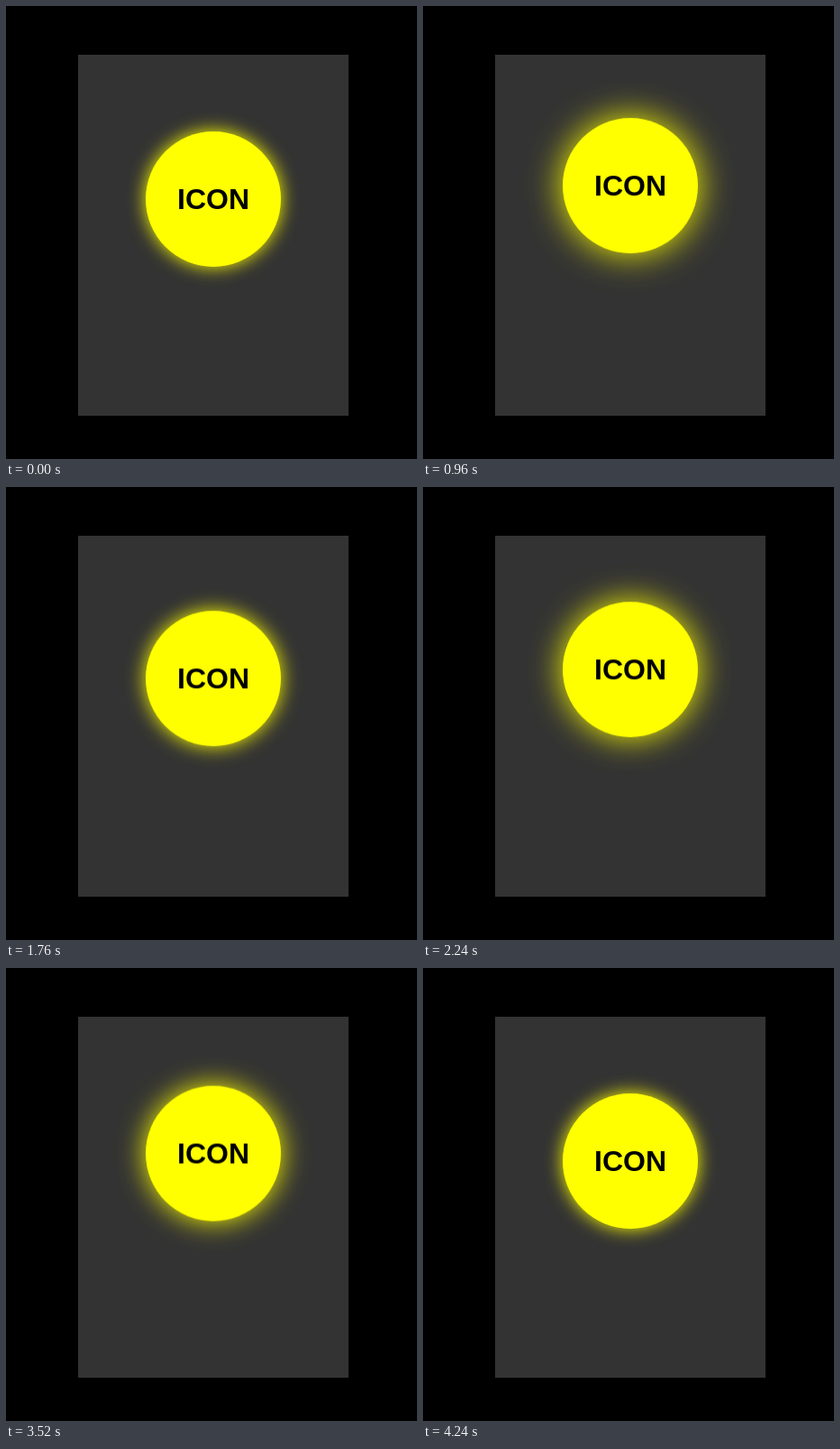
These frames come from a looping animation (456x502 px, 4320 ms). An HTML page:

```html
<!DOCTYPE html>
<html lang="en">
<head>
<meta charset="utf-8">
<title>Floating icon</title>
<style>
  html, body { margin: 0; width: 100%; height: 100%; overflow: hidden; background: #000; }
  #card { position: absolute; left: 80px; top: 54px; width: 300px; height: 400px; background: #333; }
  #icon {
    position: absolute; left: 75px; top: 85px; width: 150px; height: 150px;
    border-radius: 50%; background: #ff0; color: #000; will-change: transform;
    font: bold 32px/150px "Liberation Sans", Arial, sans-serif; text-align: center;
  }
</style>
</head>
<body>
<div id="card"><div id="icon">ICON</div></div>
<script>
  const LOOP = 4320, STEP = 80;
  const START = 234, END = 4240; // the icon floats between these times and rests otherwise
  const HALF = 720, LIFT = 15;
  const icon = document.getElementById("icon");

  // Linear rise and fall, 0 at rest and 1 at the top
  function lift(t) {
    if (t < START || t >= END) return 0;
    const phase = ((t - START) / HALF) % 2;
    return 1 - Math.abs(1 - phase);
  }

  function render(time) {
    const t = Math.floor((time % LOOP) / STEP) * STEP;
    const p = lift(t);
    icon.style.transform = `translateY(${-LIFT * p}px)`;
    icon.style.boxShadow = `0 0 ${20 + 20 * p}px #ff0`;
  }

  const origin = performance.now();
  function tick() {
    render(performance.now() - origin);
    requestAnimationFrame(tick);
  }
  tick();
</script>
</body>
</html>
```
